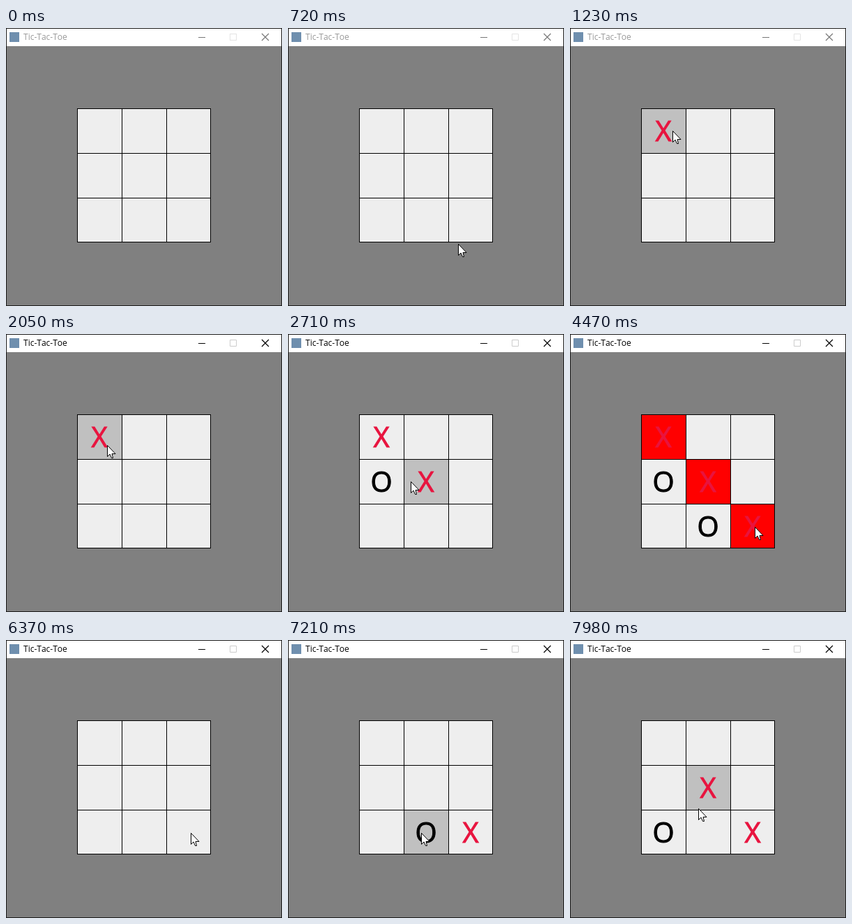
Recreate the animation shown at these times as an HTML page with a canvas. Size 396 by 398 pixels, loop 8 s.

```html
<!DOCTYPE html>
<html lang="en">
<head>
<meta charset="utf-8">
<title>Tic-Tac-Toe</title>
<style>
html, body { margin: 0; width: 100%; height: 100%; overflow: hidden; background: #808080; }
canvas { display: block; }
</style>
</head>
<body>
<canvas id="stage" width="396" height="398"></canvas>
<script>
const ctx = document.getElementById('stage').getContext('2d');
const LOOP = 8000, FOCUS = 1310, WIN = 4470, RESET = 6370;
const LEFT = 103, TOP = 116, PITCH = 64, STEP = 50;
const INK = { X: '#e8143f', O: '#000' };
const CLICKS = [FOCUS, 2400, 2800, 3850, WIN, 6730, 7520];

// Pointer strokes; each one begins where the last ended.
const ENTRY = { start: 340, x: 292, y: 388 };
const STROKES = [
  { start: 340, end: 1230, x: 147, y: 147 },
  { start: 1870, end: 2400, x: 137, y: 214 },
  { start: 2560, end: 2710, x: 176, y: 211 },
  { start: 2710, end: 3220, x: 201, y: 198 },
  { start: 3400, end: 3730, x: 201, y: 275 },
  { start: 3810, end: 4470, x: 265, y: 276 },
  { start: 6730, end: 7520, x: 141, y: 276 },
  { start: 7570, end: 7970, x: 184, y: 241 }
];

const ease = k => (1 - Math.cos(Math.PI * k)) / 2;
const mix = (a, b, k) => Math.round(a + (b - a) * k);

function pointerAt(t) {
  let { x, y } = ENTRY;
  for (const s of STROKES) {
    if (t < s.start) break;
    const span = s.end - s.start, steps = Math.round(span / STEP);
    const k = ease(Math.min(1, Math.floor((t - s.start) / span * steps) / steps));
    x = mix(x, s.x, k);
    y = mix(y, s.y, k);
  }
  return { x, y };
}

function cellAt({ x, y }) {
  const col = Math.floor((x - LEFT) / PITCH), row = Math.floor((y - TOP) / PITCH);
  return col >= 0 && col < 3 && row >= 0 && row < 3 ? row * 3 + col : -1;
}

function rect(color, x, y, w, h) {
  ctx.fillStyle = color;
  ctx.fillRect(x, y, w, h);
}

function drawWindow(active) {
  rect('#1c1c1c', 0, 0, 396, 398);
  rect('#fff', 1, 1, 394, 25);
  rect('#808080', 1, 26, 394, 371);
  rect('#6f8fae', 5, 6, 14, 14);

  ctx.font = '12px "Open Sans", "Noto Sans", sans-serif';
  ctx.fontKerning = 'none';
  ctx.textAlign = 'left';
  ctx.fillStyle = active ? '#000' : '#999';
  ctx.fillText('Tic-Tac-Toe', 25, 17);

  const ink = active ? '#000' : '#777';
  rect(ink, 276, 13, 10, 1);
  ctx.lineWidth = 1;
  ctx.strokeStyle = active ? '#ccc' : '#e4e4e4';
  ctx.strokeRect(321.5, 8.5, 9, 9);
  ctx.lineWidth = 1.2;
  ctx.strokeStyle = ink;
  ctx.beginPath();
  ctx.moveTo(367, 8);
  ctx.lineTo(377, 18);
  ctx.moveTo(377, 8);
  ctx.lineTo(367, 18);
  ctx.stroke();
}

function drawCell(i, fill, mark) {
  const col = i % 3, row = Math.floor(i / 3);
  const x = LEFT + col * PITCH, y = TOP + row * PITCH;
  rect(fill, x, y, col === 2 ? 62 : 63, row === 2 ? 62 : 63);
  if (!mark) return;
  ctx.font = '40px "Open Sans", "Noto Sans", sans-serif';
  ctx.textAlign = 'center';
  ctx.lineWidth = 1;
  ctx.lineJoin = 'miter';
  ctx.fillStyle = ctx.strokeStyle = INK[mark];
  ctx.fillText(mark, x + 31, y + 46);
  ctx.strokeText(mark, x + 31, y + 46);
}

function drawPointer({ x, y }) {
  const shape = [[0, 0], [0, 16], [3.5, 12.5], [6, 18], [8, 18], [6.5, 12], [11.5, 12]];
  ctx.beginPath();
  for (const [dx, dy] of shape) ctx.lineTo(x + dx + 0.5, y + dy + 0.5);
  ctx.closePath();
  ctx.lineWidth = 1;
  ctx.lineJoin = 'round';
  ctx.fillStyle = '#fff';
  ctx.strokeStyle = '#000';
  ctx.fill();
  ctx.stroke();
}

function draw(t) {
  const roundStart = t < RESET ? 0 : RESET;
  const clicks = CLICKS.filter(c => c >= roundStart && c <= t);
  const markOf = turn => turn % 2 ? 'O' : 'X';
  const marks = [];
  clicks.forEach((c, turn) => { marks[cellAt(pointerAt(c))] = markOf(turn); });

  const won = t >= WIN && t < RESET;
  const pointer = pointerAt(t);
  let hover = t < ENTRY.start || won ? -1 : cellAt(pointer);
  // The new board gets no enter event for the cell already under the pointer.
  if (t >= RESET && hover === 8) hover = -1;
  // An open cell previews the next mark.
  if (hover >= 0 && !marks[hover]) marks[hover] = markOf(clicks.length);

  drawWindow(t >= FOCUS);
  rect('#000', 102, 115, 192, 192);
  for (let i = 0; i < 9; i++) {
    const onDiagonal = i % 4 === 0;
    const fill = won && onDiagonal ? '#f00' : i === hover ? '#c0c0c0' : '#eee';
    drawCell(i, fill, marks[i]);
  }
  if (t >= ENTRY.start) drawPointer(pointer);
}

const start = performance.now();
function frame() {
  draw((performance.now() - start) % LOOP);
  requestAnimationFrame(frame);
}
frame();
</script>
</body>
</html>
```
